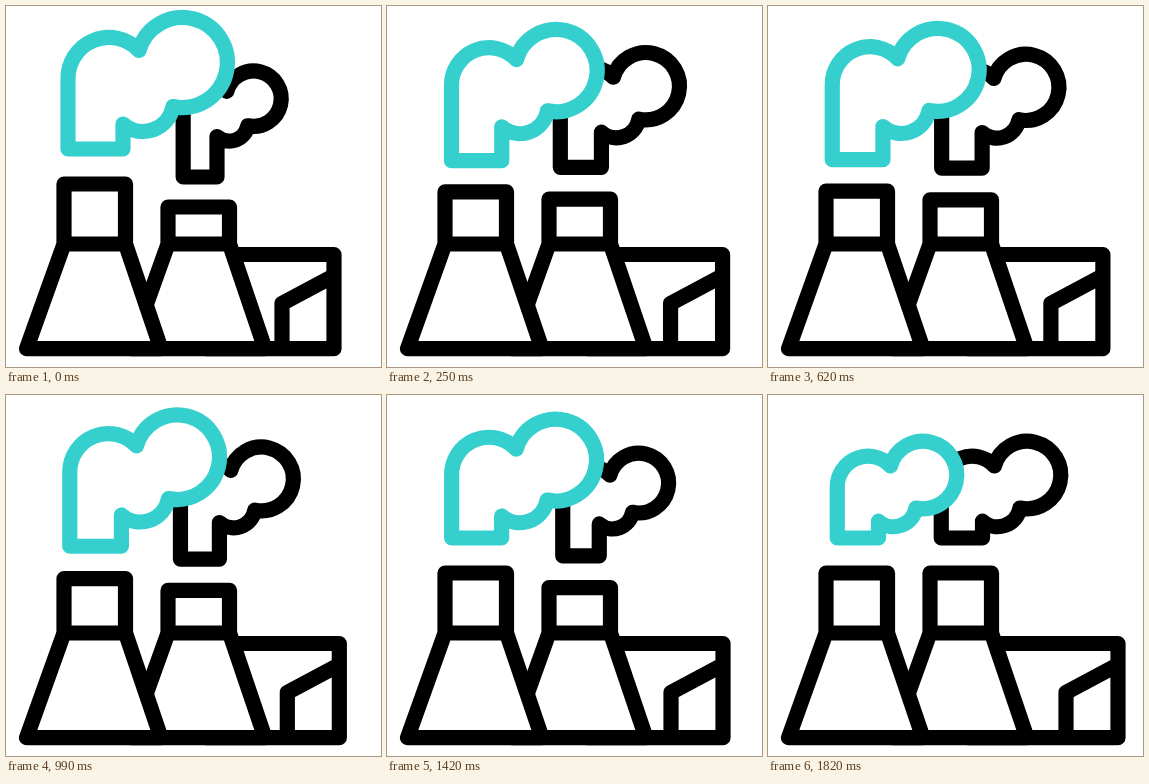
Recreate the animation shown at these times as an HTML page. Size 375 px wide and 361 px high, loop 1850 ms.

```html
<!DOCTYPE html>
<html lang="en">
<head>
<meta charset="utf-8">
<title>Power plant</title>
<style>
  html, body { margin: 0; height: 100%; overflow: hidden; background: #fff; }
  svg { display: block; width: 100vw; height: 100vh; }
  path { fill: #fff; stroke: #000; stroke-width: 15.2; stroke-linejoin: round; stroke-linecap: round; }
  #frontSmoke { stroke: #35d0ce; }
</style>
</head>
<body>
<svg viewBox="0 0 375 361">
  <path id="backSmoke"/>
  <path id="frontSmoke"/>
  <path id="hall"/>
  <path id="backTower"/>
  <path id="frontTower"/>
</svg>
<script>
const LOOP = 1850;
const GROUND = 342.7;

// Each pose: smoke scale and foot, chimney top, for both towers, and the hall's right wall
const left  = { frontScale: 1,   frontFoot: 143, frontTop: 178, backScale: .615, backFoot: 171, backTop: 201, wall: 328 };
const right = { frontScale: .75, frontFoot: 177, frontTop: 201, backScale: 1,    backFoot: 143, backTop: 178, wall: 350 };
const rest  = { frontScale: .75, frontFoot: 143, frontTop: 178, backScale: .75,  backFoot: 143, backTop: 178, wall: 350 };

const legs = [
  { start: 30,   end: 590,  from: left,  to: right },
  { start: 590,  end: 1180, from: right, to: left },
  { start: 1180, end: 1770, from: left,  to: rest },
];

const draw = (id, d) => document.getElementById(id).setAttribute('d', d);

function poseAt(time) {
  // The motion skips ahead and freezes in the middle of the loop
  const t = time >= 620 && time < 990 ? 960 : time;
  const { start, end, from, to } = legs.find(leg => t < leg.end) || legs[2];
  const x = Math.min(1, Math.max(0, (t - start) / (end - start)));
  const eased = x * x * (3 - 2 * x);
  const pose = {};
  for (const key in from) pose[key] = from[key] + (to[key] - from[key]) * eased;
  return pose;
}

function smoke(cx, scale, foot) {
  const at = (x, y) => `${cx + x * scale} ${150.5 + y * scale}`;
  const arc = (r, large, x, y) => `A${r * scale} ${r * scale} 0 ${large} 1 ${at(x, y)}`;
  return `M${cx - 29 * scale} ${foot}L${at(-29, -77)}` + arc(41, 0, 42, -106) +
    arc(45, 1, 76, -50) + arc(30.5, 0, 26, -32.5) + `V${foot}Z`;
}

const tower = (x, top) =>
  `M${x} 238L${x - 37.5} ${GROUND}H${x + 97}L${x + 61.5} 238ZV${top}H${x + 61.5}V238`;

const hall = wall =>
  `M200 248.5H${wall}V${GROUND}H200ZM${wall - 52} ${GROUND}V297.5L${wall} 269.7V${GROUND}`;

function render(now) {
  const p = poseAt(now % LOOP);
  draw('backSmoke', smoke(195, p.backScale, p.backFoot));
  draw('frontSmoke', smoke(91, p.frontScale, p.frontFoot));
  draw('hall', hall(p.wall));
  draw('backTower', tower(162, p.backTop));
  draw('frontTower', tower(58, p.frontTop));
}

const begin = performance.now();
function tick() {
  render(performance.now() - begin);
  requestAnimationFrame(tick);
}
tick();
</script>
</body>
</html>
```
